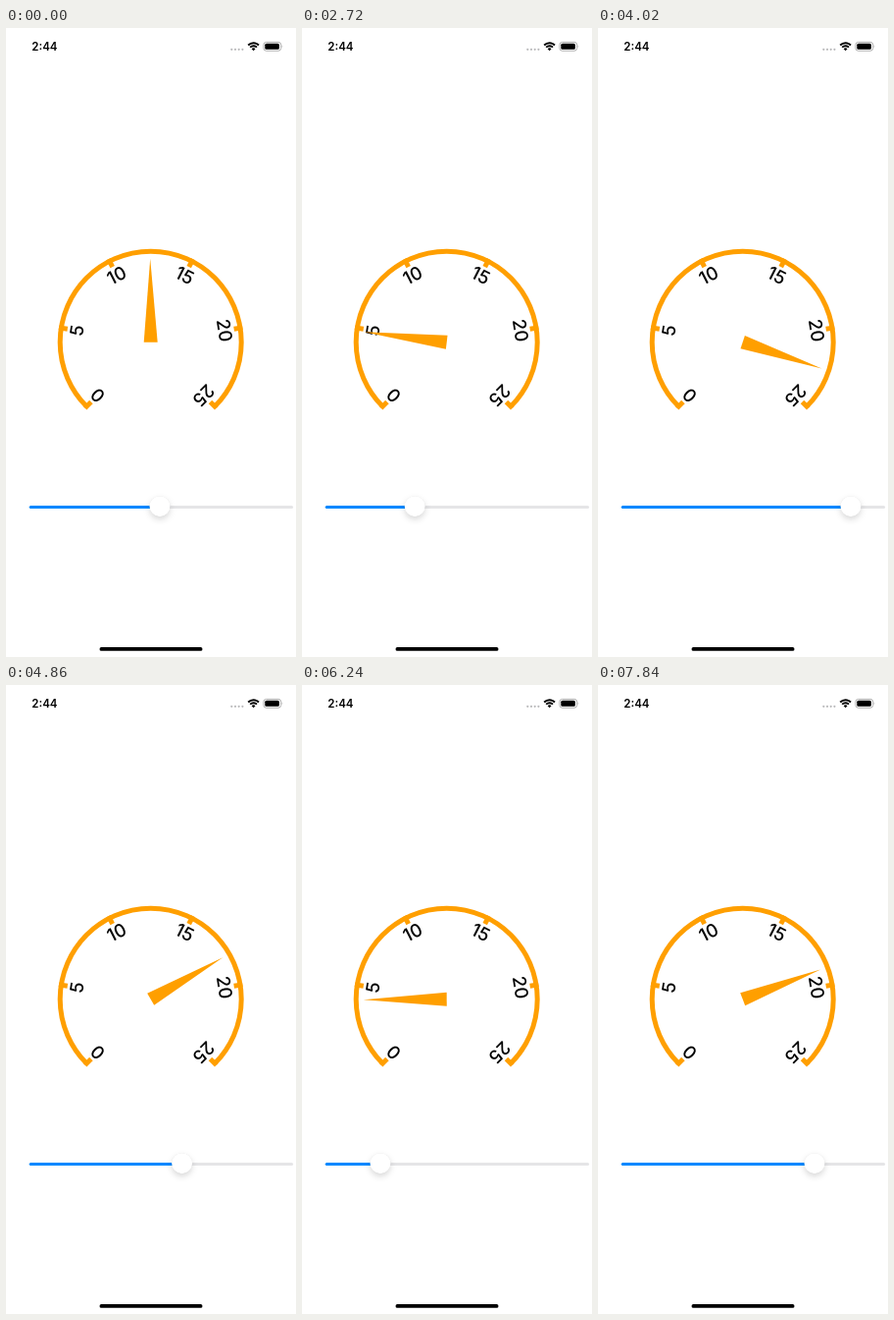
Recreate the animation shown at these times as an HTML page. Size 296 by 640 pixels, loop 7.93 s.

```html
<!DOCTYPE html>
<html lang="en">
<head>
<meta charset="utf-8">
<title>Gauge</title>
<style>
  html, body { margin: 0; width: 100%; height: 100%; overflow: hidden; background: #fff; }
  svg { display: block; width: 100%; height: 100%; font-family: Inter, Roboto, sans-serif; }
  #knob { filter: drop-shadow(0 3.5px 3px rgba(0, 0, 0, .14)) drop-shadow(0 0 .6px rgba(0, 0, 0, .12)); }
</style>
</head>
<body>
<svg viewBox="0 0 296 640">
  <!-- status bar -->
  <text x="26.3" y="22.7" font-size="11.5" font-weight="600">2:44</text>
  <path d="M230.3 21.8h12" stroke="#b9b9bb" stroke-width="2.2" stroke-linecap="round" stroke-dasharray="0 3.7"/>
  <g fill="none" stroke="#000" stroke-width="1.9">
    <path d="M247.2 17.5a7.6 7.6 0 0 1 10.8 0M249.2 19.7a4.8 4.8 0 0 1 6.8 0"/>
    <path d="M252.6 23.2l-1.9-1.9a2.7 2.7 0 0 1 3.8 0z" fill="#000" stroke="none"/>
  </g>
  <rect x="262.9" y="14.4" width="17.8" height="8.8" rx="2.7" fill="none" stroke="#a5a5a5" stroke-width=".9"/>
  <rect x="264.3" y="15.8" width="14.6" height="6" rx="1.5"/>
  <path d="M281.7 17.3q1.3 1.5 0 3z" fill="#a5a5a5"/>

  <g transform="translate(147.7 319.7)">
    <path d="M-65.4 65.4A92.5 92.5 0 1 1 65.4 65.4" fill="none" stroke="#ff9f00" stroke-width="5"/>
    <g id="scale" font-size="18.5" font-weight="500" text-anchor="middle"></g>
    <path id="needle" d="M-7 0L0-85L7 0z" fill="#ff9f00"/>
  </g>

  <g stroke-width="3.2" stroke-linecap="round">
    <path d="M25.3 487.5H291.5" stroke="#e5e5e7"/>
    <path id="fill" stroke="#08f"/>
  </g>
  <circle id="knob" cy="486.7" r="10.5" fill="#fff"/>
  <rect x="95.5" y="630.1" width="105" height="3.7" rx="1.85"/>
</svg>
<script>
const $ = id => document.getElementById(id);
const LOOP = 7930, FIRST = 892, STEP = 106.9; // ms
const LAG = 2.8; // steps the needle trails the knob
const HOME = 157;
// Drags of the knob: first step, last step, x reached
const DRAGS = [[1, 14, 79], [15, 27.3, 258], [30, 48.2, 74], [50.2, 63.2, 221]];

$('scale').innerHTML = [0, 5, 10, 15, 20, 25].map(n => `<g transform="rotate(${n * 10.8 - 135})">
  <path d="M0-86V-94.9" stroke="#ff9f00" stroke-width="5"/><text y="-69.8">${n}</text></g>`).join('');

// Mostly steady, with softened ends
const ease = p => .6 * p + .2 * (1 - Math.cos(Math.PI * p));

function knobAt(step) {
  return DRAGS.reduce((x, [start, end, to]) => {
    const p = Math.min(1, Math.max(0, (step - start) / (end - start)));
    return x + (to - x) * ease(p);
  }, HOME);
}

const needleAt = step => 1.085 * (knobAt(step - LAG) - 157.3);

function draw(now) {
  // The picture advances in discrete steps
  const step = Math.max(0, Math.floor((now % LOOP - FIRST) / STEP) + 1);
  const x = knobAt(step);
  $('knob').setAttribute('cx', x);
  $('fill').setAttribute('d', `M25.3 487.5H${x}`);
  $('needle').setAttribute('transform', `rotate(${needleAt(step)})`);
  requestAnimationFrame(draw);
}
draw(performance.now());
</script>
</body>
</html>
```
